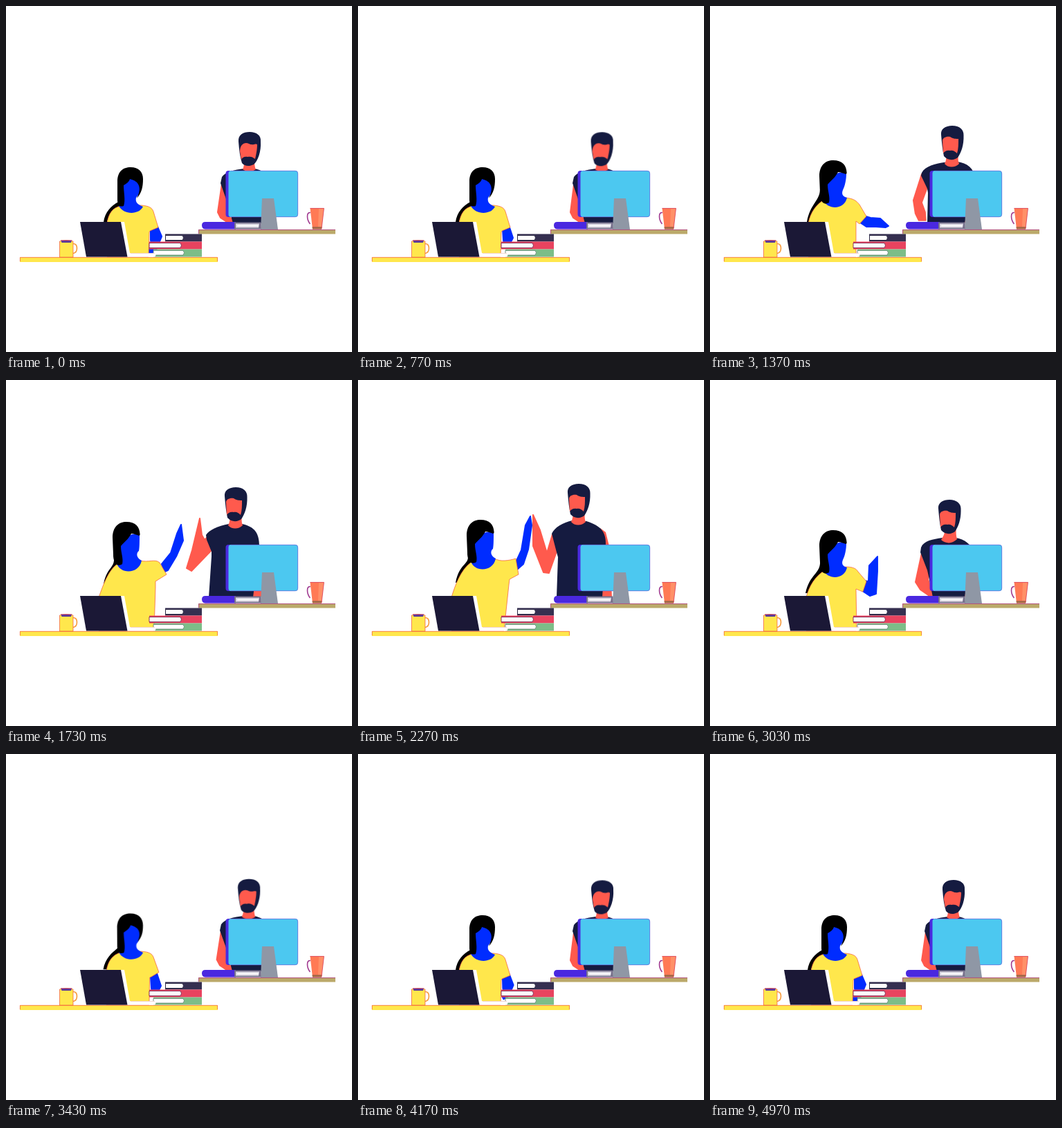
Recreate the animation shown at these times as an HTML page. Size 500 by 500 pixels, loop 5.01 s.

```html
<!DOCTYPE html>
<html lang="en">
<head>
<meta charset="utf-8">
<title>High five over the desks</title>
<style>
html, body { margin: 0; width: 100%; height: 100%; overflow: hidden; background: #fff; }
svg { display: block; width: 100vw; height: 100vh; }

:root {
  --start: cubic-bezier(.45, .1, .8, .7);
  --arrive: cubic-bezier(.2, .5, .6, 1);
  --leave: cubic-bezier(.5, 0, .75, .75);
  --settle: cubic-bezier(.12, .6, .3, 1);
  --yellow: #ffe74c;
  --blue: #002cff;
  --coral: #ff5a4d;
  --navy: #151b40;
  --ink: #1b1836;
}
.move { animation: 5010ms linear infinite; }
.skin-w { fill: var(--blue); }
.skin-m { fill: var(--coral); }
.navy { fill: var(--navy); }
.ink { fill: var(--ink); }
.yellow { fill: var(--yellow); }
.limb { stroke-width: 2; stroke-linejoin: round; }
.skin-w.limb { stroke: var(--blue); }
.skin-m.limb { stroke: var(--coral); }
.fringe { stroke: #f2553c; stroke-width: .7; }

/* Woman */
#woman { animation-name: lean; }
@keyframes lean {
  0%, 34.53%, 43.5%, to { transform: none; animation-timing-function: ease-in-out; }
  38.9% { transform: translate(-4px, 0); animation-timing-function: ease-in-out; }
}
#w-strand { animation-name: w-strand; }
@keyframes w-strand {
  0%, 21.36%, 75.25%, to { d: path("M163,283 C152,288 143,298 141,312 L146,312 C149,300 156,292 168,290Z"); animation-timing-function: var(--start); }
  27.35% { d: path("M159,262 C160,282 145,284 140,312 L146,312 C150,295 160,284 170,278Z"); animation-timing-function: var(--arrive); }
  34.53% { d: path("M155,252 C160,272 146,268 141,295 L145,293 C149,282 157,274 168,267Z"); animation-timing-function: ease-in-out; }
  45.31%, 49.5% { d: path("M158,250 C163,268 147,262 141,293 L146,292 C151,280 160,270 171,263Z"); animation-timing-function: var(--leave); }
  60.48% { d: path("M159,262 C160,280 144,280 138,308 L145,308 C150,292 160,282 171,275Z"); animation-timing-function: var(--settle); }
}
#w-shirt { animation-name: w-shirt; }
@keyframes w-shirt {
  0%, 21.36%, 75.25%, to { d: path("M146,314 C148,300 154,291 166,289 L196,288 C206,289 211,291 213,297 L220,320 L208,325 L207,327 L206,362 L146,362Z"); animation-timing-function: var(--start); }
  27.35% { d: path("M142,314 C145,298 154,286 165,280 L195,277 C208,278 212,282 216,287 L226,304 L216,315 L211,311 L211,362 L142,362Z"); animation-timing-function: var(--arrive); }
  34.53% { d: path("M134,314 C140,298 147,275 162,265 L194,261 C206,264 216,258 222,264 L232,281 L216,291 L216,300 L214,362 L134,362Z"); animation-timing-function: ease-in-out; }
  45.31%, 49.5% { d: path("M135,314 C140,298 148,274 164,263 L197,258 C206,263 218,261 228,258 L232,281 L219,288 L218,296 L211,362 L135,362Z"); animation-timing-function: var(--leave); }
  60.48% { d: path("M139,314 C143,298 152,283 166,275 L196,270 C206,270 211,272 214,277 L226,291 L221,306 L211,302 L212,362 L139,362Z"); animation-timing-function: var(--settle); }
}
#w-arm { animation-name: w-arm; }
@keyframes w-arm {
  0%, 10.6%, 21.36%, 75.25%, 85.2%, 99%, to { d: path("M219,319 L225,333 L216,355 L207,357 L206,352 L210,345 L209,338 L209,323Z"); animation-timing-function: var(--start); }
  5.4%, 16%, 68.46%, 80.2%, 92% { d: path("M218,317 L224,335 L221,341 L216,350 L213,350 L211,345 L210,338 L209,321Z"); }
  27.35% { d: path("M225,304 L232,306 L246,307 L258,318 L254,320 L240,319 L226,319 L217,313Z"); animation-timing-function: var(--arrive); }
  34.53% { d: path("M225,266 L238,250 L247,222 L253,209 L256,232 L246,255 L234,275 L229,277Z"); animation-timing-function: ease-in-out; }
  45.31%, 49.5% { d: path("M229,261 L236,246 L242,210 L249,197 L251,210 L246,245 L239,266 L231,273Z"); animation-timing-function: var(--leave); }
  60.48% { d: path("M222,290 L229,291 L230,268 L242,255 L242,276 L240,309 L231,312 L219,304Z"); animation-timing-function: var(--settle); }
}
#w-head { animation-name: w-head; }
@keyframes w-head {
  0%, 21.36%, 75.25%, to { transform: none; animation-timing-function: var(--start); }
  27.35% { transform: translate(4px, 18px); animation-timing-function: var(--arrive); }
  34.53% { transform: none; animation-timing-function: ease-in-out; }
  45.31%, 49.5% { transform: translate(3px, -3px); animation-timing-function: var(--leave); }
  60.48% { transform: translate(4px, 12px); animation-timing-function: var(--settle); }
}
#w-face { animation-name: w-face; }
@keyframes w-face {
  0%, 21.36%, 75.25%, to { d: path("M169,255 C172,248 188,246 195,252 C196,264 193,272 188,277 C187,282 188,286 198,290 C192,302 170,302 163,289 C168,288 170,284 167,276Z"); animation-timing-function: var(--start); }
  27.35%, 60.48% { d: path("M163,240 C172,226 182,219 193,224 C193,233 191,242 188,248 C186,253 187,257 194,259 C190,277 166,277 159,262 C164,262 166,256 163,250Z"); animation-timing-function: var(--settle); }
  34.53%, 45.31%, 49.5% { d: path("M163,240 C172,226 182,219 193,224 C193,234 193,242 192,247 C188,250 188,257 196,261 C192,281 165,281 160,265 C164,264 166,256 163,250Z"); animation-timing-function: var(--leave); }
}
#w-hair { animation-name: w-hair; }
@keyframes w-hair {
  0%, 21.36%, 75.25%, to { d: path("M161,254 C161,239 169,233 180,233 C192,233 198,240 198,250 C198,262 196,270 189,278 C197,262 192,253 179,250 C178,254 174,257 170,259 C170,269 173,281 170,289 C164,291 161,288 161,280Z"); animation-timing-function: var(--start); }
  27.35%, 34.53%, 45.31%, 49.5%, 60.48% { d: path("M154,228 C154,212 163,205 174,205 C187,205 193,212 193.5,222 C194,224 193,225 192,225 C189,224 185,222 181,222 C177,230 171,234 166,240 C166,250 170,258 168,266 C160,271 155,264 155,252Z"); animation-timing-function: var(--settle); }
}

/* Man */
#m-far { animation-name: m-far; }
@keyframes m-far {
  0%, 27.35%, 60.48%, to { d: path("M350,250 L365,250 L375,260 L380,313 L366,313Z"); }
  34.53% { d: path("M352,216 L362,224 L366,242 L370,313 L352,313Z"); }
  45.31%, 49.5% { d: path("M350,214 L358,220 L363,240 L367,313 L350,313Z"); }
}
#m-arm { animation-name: m-arm; }
@keyframes m-arm {
  0%, 21.36%, 75.25%, to { d: path("M313,250 L306,298 L310,306 L319,312 L331,312 L321,303 L318,290 L318,264Z"); animation-timing-function: var(--start); }
  5.4%, 16%, 80.2%, 92% { d: path("M313,250 L307,298 L311,306 L320,312 L332,312 L321,303 L318,290 L318,264Z"); }
  27.35% { d: path("M306,243 L294,281 L297,300 L302,310 L312,310 L311,298 L306,284 L314,262Z"); }
  30.74% { d: path("M297,235 L284,262 L262,258 L238,262 L250,271 L274,282 L284,281 L305,254Z"); animation-timing-function: var(--arrive); }
  34.53% { d: path("M291,227 L287,231 L283,224 L280,200 L269,246 L261,272 L268,276 L297,246Z"); animation-timing-function: ease-in-out; }
  45.31%, 49.5% { d: path("M281,223 L273,250 L263,217 L253,195 L253,240 L268,278 L276,279 L287,248Z"); animation-timing-function: var(--leave); }
  55.7% { d: path("M294,234 L281,262 L260,259 L238,264 L249,273 L272,283 L282,282 L302,254Z"); }
  60.48% { d: path("M306,250 L297,292 L304,303 L317,312 L330,312 L320,303 L315,288 L316,270Z"); animation-timing-function: var(--settle); }
}
#m-torso { animation-name: m-torso; }
@keyframes m-torso {
  0%, 21.36%, 75.25%, to { d: path("M344,235 C330,237 318,239 312,247 L310,256 L318,279 L320,285 L328,314 L372,314 L380,250 C376,240 368,237 359,235Z"); animation-timing-function: var(--start); }
  27.35% { d: path("M338,226 C326,228 311,231 306,241 L305,245 L314,264 L315,270 L314,314 L368,314 L384,250 C381,234 372,227 357,225Z"); animation-timing-function: var(--arrive); }
  34.53% { d: path("M322,208 C306,211 293,217 289,224 L290,231 L297,248 L297,255 L293,314 L357,314 L366,240 C366,222 360,212 341,208Z"); animation-timing-function: ease-in-out; }
  45.31%, 49.5% { d: path("M310,203 C296,206 284,213 280,222 L281,226 L287,249 L289,256 L287,314 L353,314 L358,240 C359,220 352,211 330,204Z"); animation-timing-function: var(--leave); }
  60.48% { d: path("M336,228 C322,230 309,232 305,242 L304,249 L314,275 L316,284 L322,314 L368,314 L380,250 C378,237 368,230 355,228Z"); animation-timing-function: var(--settle); }
}
#m-head { animation-name: m-head; }
@keyframes m-head {
  0%, 21.36%, 75.25%, 95.8%, to { transform: none; animation-timing-function: var(--start); }
  10.6%, 85.2% { transform: translate(1px, .5px); animation-timing-function: ease-in-out; }
  27.35% { transform: translate(18px, 18px); animation-timing-function: var(--arrive); }
  34.53% { transform: none; animation-timing-function: ease-in-out; }
  45.31%, 49.5% { transform: translate(-13px, -5px); animation-timing-function: var(--leave); }
  60.48% { transform: translate(14px, 18px); animation-timing-function: var(--settle); }
}
#m-neck { animation-name: m-neck; }
@keyframes m-neck {
  0%, 21.36%, 75.25%, to { d: path("M344,224 L359,222 C359,230 360,234 361,236 C356,240 347,240 342,236 C344,232 344,228 344,224Z"); animation-timing-function: var(--start); }
  27.35%, 34.53%, 45.31%, 49.5% { d: path("M323,196 L341,194 C340,204 341,207 342,210 C336,216 326,216 321,210 C323,206 324,202 323,196Z"); animation-timing-function: var(--leave); }
  60.48% { d: path("M325,196 L342,193 C341,204 342,208 343,212 C336,219 327,219 320,213 C324,207 326,202 325,196Z"); animation-timing-function: var(--settle); }
}
#m-hair { animation-name: m-hair; }
@keyframes m-hair {
  0%, 21.36%, 75.25%, to { d: path("M336,196 C335,186 343,182 352,182 C362,182 369,187 368,196 C369,210 364,224 358,229 C352,232 345,232 341,227 C338,218 337,208 336,196Z"); animation-timing-function: var(--start); }
  27.35%, 34.53%, 45.31%, 49.5%, 60.48% { d: path("M316,168 C315,160 322,155 332,155 C343,155 349,161 348.5,169 C349,183 345,194 340,201 C335,205 326,206 320,199 C318,190 317,180 316,168Z"); animation-timing-function: var(--settle); }
}
#m-face { animation-name: m-face; }
@keyframes m-face {
  0%, 21.36%, 75.25%, to { d: path("M338,210 C338,200 345,196 351,199 C356,202 361,198 363,200 C363,206 362,212 360,221 C356,218 354,217 349,218 C345,217 341,219 340,222Z"); animation-timing-function: var(--start); }
  27.35%, 34.53%, 45.31%, 49.5%, 60.48% { d: path("M318,177 C318,172 324,170 329,171 C333,174 338,174 341,174 C341,182 341,188 339,195 C336,192 333,190 329,191 C324,190 321,192 319,195Z"); animation-timing-function: var(--settle); }
}
</style>
</head>
<body>
<svg viewBox="0 0 500 500">
  <g id="woman" class="move">
    <path id="w-strand" class="move"/>
    <path id="w-arm" class="move skin-w limb"/>
    <path id="w-shirt" class="move yellow fringe"/>
    <g id="w-head" class="move">
      <path id="w-face" class="move skin-w"/>
      <path id="w-hair" class="move"/>
    </g>
  </g>

  <g id="man">
    <path id="m-far" class="move skin-m"/>
    <path id="m-arm" class="move skin-m limb"/>
    <path id="m-torso" class="move navy"/>
    <g id="m-head" class="move">
      <path id="m-neck" class="move skin-m"/>
      <path id="m-hair" class="move navy"/>
      <path id="m-face" class="move skin-m"/>
    </g>
  </g>

  <g id="monitor">
    <rect x="317.5" y="238" width="103" height="67" rx="4" fill="#4a2be0"/>
    <rect x="321.5" y="238" width="100.5" height="67" rx="4" fill="#4cc8f0"/>
    <path d="M325,238.3H418Q421.7,238.3 421.7,242V301Q421.7,304.7 418,304.7H325" fill="none" stroke="#6a5fdc" stroke-width=".7"/>
    <path d="M370,278H387L393,323H368Z" fill="#8f97a5"/>
  </g>

  <g id="purple-book">
    <path d="M332,312H288Q283,312 283,317T288,322.5H332Z" fill="#4a28e0"/>
    <rect x="330" y="312.5" width="38.5" height="10" fill="#77718c"/>
    <path d="M332,314.5H366L365,320.5H332Z" fill="#d9d7e2"/>
    <path d="M334,317.5H365" stroke="#fff" stroke-width="2"/>
  </g>

  <g id="orange-mug">
    <path d="M440,298.5Q435.5,298 435.5,304T439.5,315" fill="none" stroke="#a03a90" stroke-width="1.6"/>
    <path d="M439.5,292H459.5L456,322.5H443Z" fill="#ff7a55"/>
    <path d="M452,293H459L456,319H451Z" fill="#ff9068"/>
    <path d="M442.6,319H456.4L456,322.5H443Z" fill="#a86a4a"/>
    <path d="M439.5,292.4H459.5L456,322" fill="none" stroke="#d8405c" stroke-width=".8"/>
  </g>

  <g id="upper-desk">
    <rect x="278" y="323" width="198" height="6.5" fill="#bba96a"/>
    <path d="M278.5,329V323.4H476" fill="none" stroke="#b0457e" stroke-width=".9"/>
  </g>

  <g id="books">
    <path d="M230,329.5H283V340.5H230Z" fill="#352f50"/>
    <path d="M230.5,331.5H255Q258,335 255,338.5H230.5Z" fill="#fff" stroke="#1b1836" stroke-width=".9"/>
    <path d="M207,340.5H283V351.5H207Z" fill="#e8435f"/>
    <path d="M207,342.5H252Q255,346 252,349.5H207Z" fill="#fff" stroke="#7a1f4a" stroke-width=".9"/>
    <path d="M213,351.5H283V362.5H213Z" fill="#7cbd88"/>
    <path d="M213,353.3H256Q259,356.5 256,360H213Z" fill="#fff" stroke="#537a68" stroke-width=".8"/>
  </g>

  <g id="lower-desk">
    <rect class="yellow" x="20" y="363" width="286" height="7"/>
    <path class="fringe" d="M20.4,369V363.3H305.6V369" fill="none"/>
  </g>

  <g id="laptop">
    <path d="M165,312H171L179,357H215Q218,359.5 215,362.5H174Z" fill="#fff"/>
    <path d="M180,357.4H215" stroke="#e9b6b0" stroke-width=".6"/>
    <path class="ink" d="M107,312H166L175.5,362.5H116Z"/>
  </g>

  <g id="yellow-mug">
    <path d="M97,343.5Q102.5,343.5 102.5,350T97,357.5" fill="none" stroke="#f79a3a" stroke-width="1.6"/>
    <path class="yellow fringe" d="M77.5,340Q87,337 97,340V363H77.5Z"/>
    <path d="M79.5,338.8H95L94,342H80.5Z" fill="#5b3a9a"/>
    <path d="M79,338.7H95.5" stroke="#d8405c" stroke-width=".8"/>
  </g>
</svg>
</body>
</html>
```
